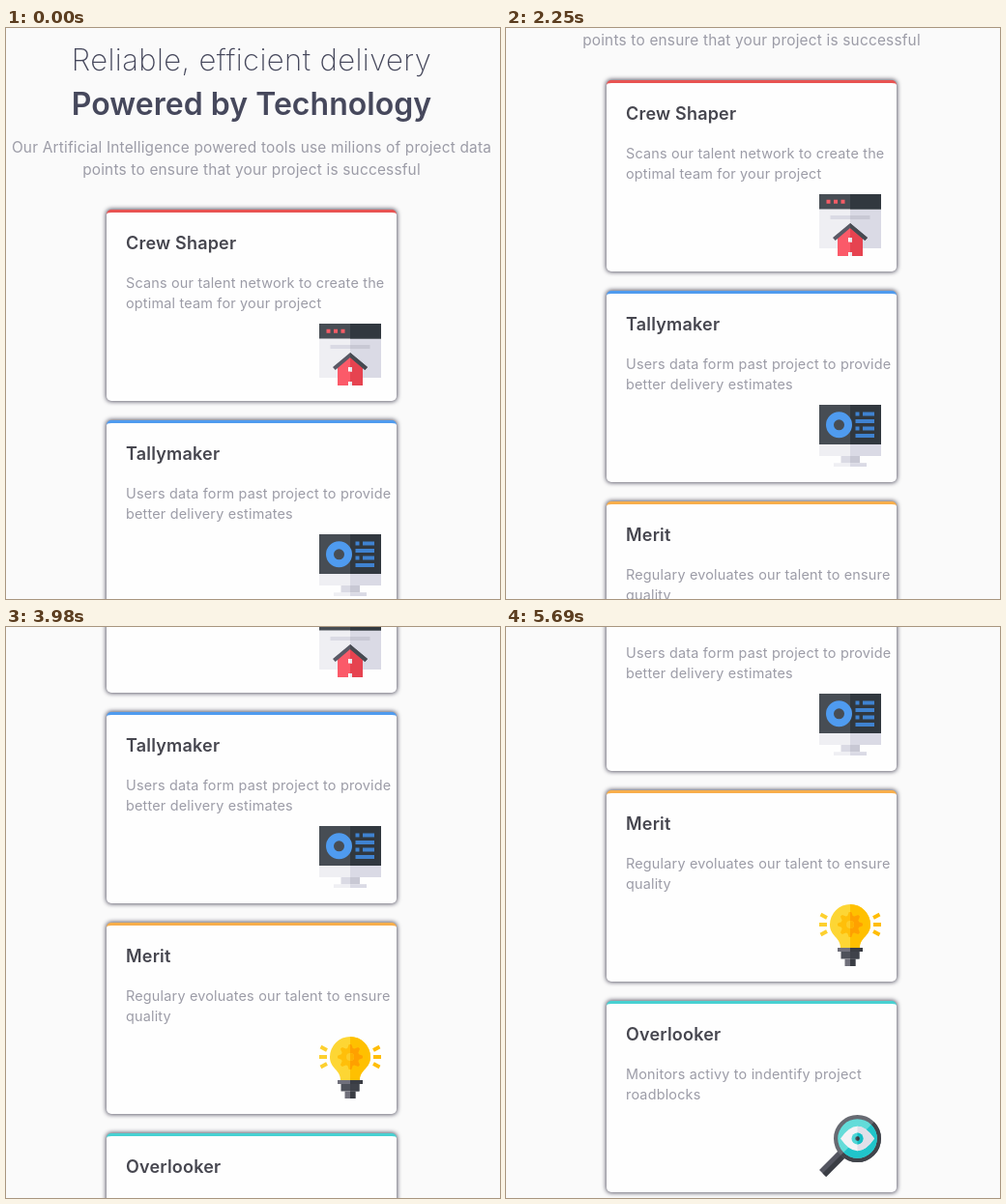
Recreate the animation shown at these times as an HTML page. Size 511x591 px, loop 7.83 s.

```html
<!DOCTYPE html>
<html lang="en">
<head>
<meta charset="utf-8">
<title>Delivery tools</title>
<style>
  html, body { margin: 0; width: 100%; height: 100%; overflow: hidden; background: #fafafa; }
  body { position: relative; font: 14.4px Inter, "Open Sans", sans-serif; font-optical-sizing: none; letter-spacing: .2px; }
  #page { position: absolute; left: 0; top: 0; width: 511px; height: 1060px; }
  svg { position: absolute; left: 0; top: 0; overflow: visible; }
  text { fill: #9c9ca7; }
  .intro { text-anchor: middle; font-size: 15.4px; }
  .thin { text-anchor: middle; font-size: 31px; font-weight: 200; letter-spacing: .4px; fill: #46485c; }
  .bold { text-anchor: middle; font-size: 32px; font-weight: 600; letter-spacing: .05px; fill: #46485c; }
  .name { font-size: 18px; font-weight: 600; fill: #46464f; }
  .card {
    position: absolute; left: 104px; width: 300px; height: 198px; box-sizing: border-box;
    border-top: 3px solid; border-radius: 5px; background: #fefefe;
    box-shadow: 0 0 4px 1px rgba(48, 46, 66, .75);
  }
</style>
</head>
<body>
<div id="page">
  <svg width="511" height="180">
    <defs><clipPath id="half"><rect x="32" y="-99" width="99" height="250"/></clipPath></defs>
    <text class="thin" x="254" y="44">Reliable, efficient delivery</text>
    <text class="bold" x="254" y="90">Powered by Technology</text>
    <text class="intro" x="254" y="129">Our Artificial Intelligence powered tools use milions of project data</text>
    <text class="intro" x="254" y="152">points to ensure that your project is successful</text>
  </svg>
</div>
<script>
const page = document.getElementById('page');

// A shape in one colour with its right half repainted in a darker one.
const duo = (d, left, right) =>
  `<path d="${d}" fill="${left}"/><path d="${d}" fill="${right}" clip-path="url(#half)"/>`;
const box = (x, y, w, h) => `M${x} ${y}h${w}v${h}h${-w}z`;
const disc = (x, y, r) => `M${x - r} ${y}a${r} ${r} 0 1 1 ${2 * r} 0a${r} ${r} 0 1 1 ${-2 * r} 0z`;
const steel = ['#474d54', '#31383f'], pale = ['#efeff3', '#dadae5'], mist = ['#dadae4', '#c8c8d4'];

function gear(x, y) {
  let d = '';
  for (let i = 0; i < 32; i++) {
    const r = i % 4 < 2 ? 13 : 9.5, a = (i - .5) * Math.PI / 16;
    d += `${i ? 'L' : 'M'}${(x + r * Math.cos(a)).toFixed(2)} ${(y + r * Math.sin(a)).toFixed(2)}`;
  }
  return d + 'z';
}

const house =
  duo(box(0, 15.5, 64, 40.5), ...pale) +
  duo(box(0, 0, 64, 15.5), ...steel) +
  `<path d="${[7.5, 15, 22.5].map(x => box(x, 5.8, 4, 4)).join('')}" fill="#f55c66"/>` +
  duo(box(11.5, 22, 41, 4), ...mist) +
  duo('M19 64V44L32 33L45 44V64z', '#fb5a69', '#e64350') +
  duo('M32 30L50 45L47.3 48L32 35L16.7 48L14 45z', '#5a5a66', '#464a51') +
  duo(box(30, 45, 4, 4.5) + box(30, 60, 4, 4), '#fff', '#e8e8ee');

const monitor =
  duo(box(0, 41, 64, 12), ...pale) +
  duo(box(0, 0, 64, 41), ...steel) +
  duo(box(22.5, 53, 19.5, 7.5), ...mist) +
  duo(box(15, 60.3, 34, 3.7), ...pale) +
  `<circle cx="20.5" cy="20.8" r="9.5" fill="none" stroke="#4f9bef" stroke-width="8"/>` +
  `<path d="${box(37.5, 7.5, 4, 4) + box(45, 7.5, 12, 4) + box(37.5, 15, 19.5, 4) +
    box(37.5, 22.5, 4, 4) + box(45, 22.5, 12, 4) + box(37.5, 30, 19.5, 4)}" fill="#3f82d0"/>`;

const rays = 'M0 21H8M1.5 10.5L8 14M1.5 31.5L8 28';
const bulb =
  `<path d="${rays}" stroke="#fdd02f" stroke-width="3.8"/>` +
  `<path d="${rays}" stroke="#ffbd06" stroke-width="3.8" transform="matrix(-1 0 0 1 64 0)"/>` +
  duo('M11 21a21 21 0 1 1 42 0C53 33 42 34 42 45H22C22 34 11 33 11 21z', '#fdd634', '#ffc000') +
  duo(gear(32, 21), '#ffbf0a', '#ffa000') +
  duo(disc(32, 21, 4), '#fdcd2a', '#ffb000') +
  duo(box(19, 45, 26, 4), '#70707b', '#3a3d44') +
  duo(box(22.5, 49, 19, 7.5), '#4e515a', '#3f424a') +
  duo(box(26.5, 56.5, 11, 7.5), '#70707b', '#3a3d44');

const lens =
  `<g transform="translate(39.5 24.5) rotate(45) translate(-32 0)">` +
  duo(box(27, 23, 10, 27.8), '#555661', '#3b3e45') +
  duo(disc(32, 0, 24.5), '#676a72', '#41444b') +
  duo(disc(32, 0, 20.3), '#63dcd9', '#20c5cb') + '</g>' +
  `<g transform="translate(7.5 0)">` +
  duo('M14.5 24.5Q32 -1 49.5 24.5Q32 50 14.5 24.5z', '#f3f3f6', '#e0e0e9') +
  duo(disc(32, 24.5, 6), '#4fd6d6', '#14bfc6') +
  duo(disc(32, 24.5, 2.2), '#4a4d56', '#363940') + '</g>';

const cards = [
  ['#e85352', 'Crew Shaper', 'Scans our talent network to create the', 'optimal team for your project', house],
  ['#4f9bef', 'Tallymaker', 'Users data form past project to provide', 'better delivery estimates', monitor],
  ['#f8ae4b', 'Merit', 'Regulary evoluates our talent to ensure', 'quality', bulb],
  ['#47d1d2', 'Overlooker', 'Monitors activy to indentify project', 'roadblocks', lens],
];
page.insertAdjacentHTML('beforeend', cards.map(([color, name, line1, line2, icon], i) => `
  <div class="card" style="top:${188 + 218 * i}px;border-color:${color}">
    <svg width="300" height="195">
      <text class="name" x="20" y="38">${name}</text>
      <text x="20" y="78">${line1}</text>
      <text x="20" y="99">${line2}</text>
      <g transform="translate(220 115)">${icon}</g>
    </svg>
  </div>`).join(''));

// Scroll bursts: start time, number of steps, end position, easing power.
const LOOP = 7830, STEP = 70;
const bursts = [
  [500, 2, 3, 1], [800, 14, 86, 1.755], [2040, 9, 194, 1],
  [2860, 17, 318, .855], [4240, 14, 430, 1], [5480, 4, 455, 1],
];

function scrollAt(t) {
  let y = 0;
  for (const [start, count, end, power] of bursts) {
    if (t < start) break;
    const k = Math.min(count, Math.floor((t - start) / STEP) + 1);
    y += (end - y) * (k / count) ** power;
  }
  return Math.round(y);
}

function draw() {
  page.style.top = -scrollAt(performance.now() % LOOP) + 'px';
  requestAnimationFrame(draw);
}
draw();
</script>
</body>
</html>
```
